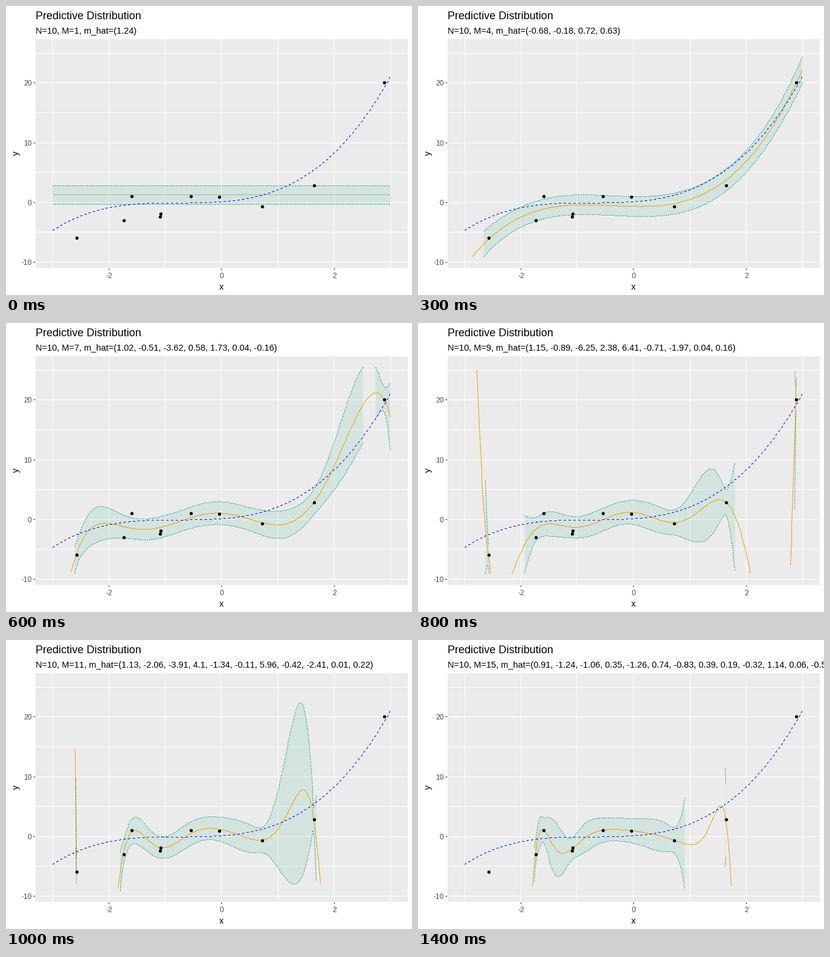
Recreate the animation shown at these times as a matplotlib script. Size 672x480 px, loop 1500 ms.

```python
import numpy as np
import matplotlib.pyplot as plt
from matplotlib.animation import ArtistAnimation
from matplotlib.patches import Rectangle

plt.rcParams.update({
    "font.family": "Liberation Sans",
    "text.kerning_factor": 6,
    "lines.scale_dashes": False,
})

W, H, DPI = 672, 480, 96
PT = 72 / DPI
LEFT, TOP, RIGHT, BOTTOM = 49.1, 55.05, 664.67, 434.7
GREEN, ORANGE, BLUE, SAGE = "#009E73", "#F0A000", "#0000FF", "#8FBFA6"

SIGMA, ALPHA = 1.5, 0.01
RIDGE = ALPHA * SIGMA ** 2
MAX_TERMS = 15

SAMPLE = np.array([
    (-2.580, -5.90), (-1.741, -2.96), (-1.602, 1.08), (-1.098, -2.36),
    (-1.087, -1.85), (-0.551, 1.09), (-0.047, 0.98), (0.714, -0.65),
    (1.636, 2.88), (2.880, 20.13),
])
xs, ys = SAMPLE.T
N = len(xs)


def truth(x):
    return 0.1 + 0.7 * x + 0.9 * x ** 2 + 0.4 * x ** 3


grid = np.linspace(-3, 3, 601)
Y_MIN = truth(-3) - 3 * SIGMA
Y_MAX = truth(3) + 3 * SIGMA
PAD = 0.05 * (Y_MAX - Y_MIN)


def basis(x, terms):
    return np.vander(x, terms, increasing=True)


def predict(terms):
    """Posterior mean weights, predictive mean and deviation on the grid."""
    design = np.vstack([basis(xs, terms), np.sqrt(RIDGE) * np.eye(terms)])
    q, r = np.linalg.qr(design)
    weights = np.linalg.solve(r, q[:N].T @ ys)
    phi = basis(grid, terms)
    spread = np.linalg.solve(r.T, phi.T)
    return weights, phi @ weights, SIGMA * np.sqrt(1 + (spread ** 2).sum(axis=0))


def px(x):
    return LEFT + (np.asarray(x) + 3.3) / 6.6 * (RIGHT - LEFT)


def py(y):
    span = Y_MAX - Y_MIN + 2 * PAD
    return TOP + (Y_MAX + PAD - np.asarray(y)) / span * (BOTTOM - TOP)


def centre(v):
    """Centre of the pixel that holds v."""
    return np.floor(v) + 0.5


fig = plt.figure(figsize=(W / DPI, H / DPI), dpi=DPI, facecolor="white")
ax = fig.add_axes([0, 0, 1, 1])
ax.set_xlim(0, W)
ax.set_ylim(H, 0)
ax.axis("off")


def stroke(x, y, color, style="-", z=1):
    """One pixel wide line through pixel centres."""
    return ax.plot(centre(x), centre(y), color=color, ls=style, lw=PT,
                   zorder=z, snap=False, dash_capstyle="butt",
                   solid_capstyle="butt")[0]


def dashes(on, off):
    return (0, (on * PT, off * PT))


def write(x, y, text, size, color="black", **kw):
    return ax.text(x, y, text, fontsize=size * PT, color=color,
                   **{"va": "baseline", **kw})


def draw_panel():
    ax.add_patch(Rectangle((49, 55), RIGHT - 49, BOTTOM - 55, fc="#EBEBEB",
                           ec="none", antialiased=False, zorder=0))
    for v in range(-3, 4):
        stroke([px(v)] * 2, [54, 435], "white", z=0.5)
    for v in range(-10, 30, 5):
        stroke([48, 665], [py(v)] * 2, "white", z=0.5)
    for v in (-2, 0, 2):
        stroke([px(v)] * 2, [435, 438], "#333333")
        write(px(v), 452, str(v), 12, "#4D4D4D", ha="center")
    for v in (-10, 0, 10, 20):
        stroke([45, 48], [py(v)] * 2, "#333333")
        write(42.5, py(v) + 4.5, str(v), 12, "#4D4D4D", ha="right")
    write(49, 22, "Predictive Distribution", 18)
    write(px(0), 471, "x", 14.5, ha="center")
    write(16.5, 244, "y", 14.5, ha="center", va="center", rotation=90)


def subtitle(weights):
    text = ", ".join(f"{round(w, 2) + 0.0:g}" for w in weights)
    return f"N={N}, M={len(weights)}, m_hat=({text})"


def draw_model(terms):
    weights, mid, sd = predict(terms)
    low, high = mid - sd, mid + sd

    # Values beyond the scale limits are dropped
    inside = (low >= Y_MIN) & (high <= Y_MAX)
    mid = np.where((mid >= Y_MIN) & (mid <= Y_MAX), mid, np.nan)
    low, high = (np.where(inside, v, np.nan) for v in (low, high))

    gx = px(grid)
    ribbon = ax.fill_between(gx, py(low), py(high), where=inside, fc=GREEN,
                             alpha=0.1, lw=0, zorder=1)
    edges = [stroke(gx, py(v), GREEN, dashes(2, 2), 2) for v in (low, high)]
    line = stroke(gx, py(mid), SAGE if terms == 1 else ORANGE, z=1.5)
    label = write(49, 45.7, subtitle(weights), 14.47)
    return [ribbon, *edges, line, label]


draw_panel()
stroke(px(grid), py(truth(grid)), BLUE, dashes(4, 4), 3)
ax.plot(centre(px(xs)), centre(py(ys)), "o", color="black", ms=5.4 * PT,
        mew=0, zorder=4)

models = [draw_model(m) for m in range(1, MAX_TERMS + 1)]
anim = ArtistAnimation(fig, models, interval=100, repeat=True,
                       repeat_delay=0, blit=False)
plt.show()
```
